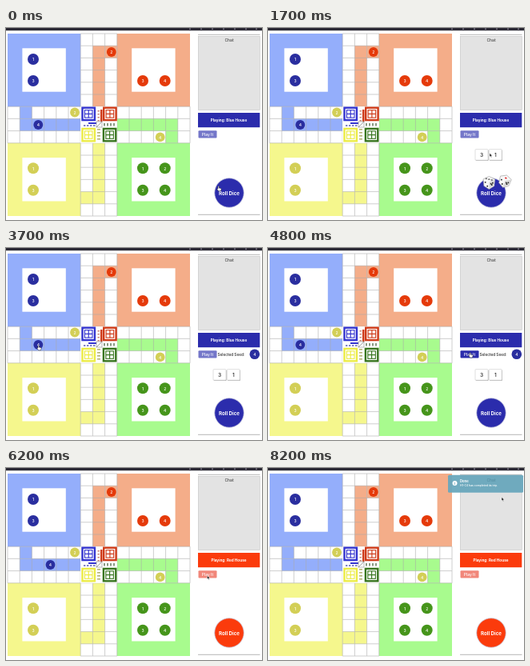
These frames come from a looping animation (320 px wide and 240 px high, 8.3 s). An HTML page:

```html
<!DOCTYPE html>
<html lang="en">
<head>
<meta charset="utf-8">
<title>Board game</title>
<style>
  html, body { margin: 0; width: 100%; height: 100%; overflow: hidden; background: #fff; }
  svg { display: block; width: 100vw; height: 100vh; }
  text { font-family: Inter, Roboto, sans-serif; font-weight: 500; text-anchor: middle; dominant-baseline: central; }
  .left { text-anchor: start; }
  .bold { font-weight: 700; }
</style>
</head>
<body>
<svg id="stage" viewBox="0 0 320 240"></svg>
<script>
const LOOP = 8300, CELL = 15.2, X0 = 2, Y0 = 7;
const LIGHT = { blue: '#94aefb', red: '#f4ad89', yellow: '#f5f78d', green: '#a8fb8e' };
const DARK = { blue: '#2a2e9f', red: '#e53a0a', yellow: '#d3cf56', green: '#46951b' };
const EMBLEM = { blue: '#3434cf', red: '#cf3a18', yellow: '#ecec45', green: '#38751f' };

const rect = (x, y, w, h, fill, extra = '') =>
  `<rect x="${x}" y="${y}" width="${w}" height="${h}" fill="${fill}" ${extra}/>`;
const text = (x, y, size, fill, str, extra = '') =>
  `<text x="${x}" y="${y}" font-size="${size}" fill="${fill}" ${extra}>${str}</text>`;
const line = (x1, y1, x2, y2, color = '#bbb', w = .7) =>
  `<path d="M${x1} ${y1}L${x2} ${y2}" stroke="${color}" stroke-width="${w}"/>`;
const cells = (col, row, w, h, fill) =>
  rect(X0 + col * CELL, Y0 + row * CELL, w * CELL, h * CELL, fill);
const token = (x, y, team, n, r) =>
  `<g transform="translate(${x} ${y})"><circle r="${r}" fill="${DARK[team]}"/>${text(0, .2, 5, '#fff', n)}</g>`;

function house(team, col, row) {
  const x = X0 + col * CELL, y = Y0 + row * CELL;
  return cells(col, row, 6, 6, LIGHT[team]) + rect(x + 18.4, y + 18.3, 54.4, 54.4, '#fff');
}

function grid() {
  let s = '';
  for (let i = 0; i <= 15; i++) {
    const x = X0 + i * CELL, y = Y0 + i * CELL;
    const [a, b] = i >= 6 && i <= 9 ? [0, 15] : [6, 9];
    s += line(x, Y0 + a * CELL, x, Y0 + b * CELL, '#a9a9a9', .8);
    s += line(X0 + a * CELL, y, X0 + b * CELL, y, '#a9a9a9', .8);
  }
  return `<g opacity=".7">${s}</g>`;
}

function emblem(team, x, y) {
  const c = EMBLEM[team];
  let s = rect(x + 1.2, y + 1.2, 15.4, 15.4, '#fff', `stroke="${c}" stroke-width="2.4"`)
        + rect(x + 3.6, y + 3.6, 10.6, 10.6, c);
  for (const i of [4.7, 9.5]) for (const j of [4.7, 9.5]) s += rect(x + i, y + j, 3.6, 3.6, '#fff');
  return s;
}

function center() {
  let s = rect(93.2, 98.2, 45.6, 45.6, '#fff')
    + rect(103, 118, 14, 2, EMBLEM.blue) + rect(118, 102, 2.5, 15, EMBLEM.red);
  for (let i = 0; i < 4; i++) {
    const d = i * 4;
    s += rect(97 + d, 121, 2.4, 2, '#8080c8') + rect(122 + d, 119, 2, 3.5, '#8a9a84')
       + rect(114.5, 103 + d, 2.5, 1.5, '#cf8a78') + rect(114, 126 + d, 4, 1.6, '#b4b478');
  }
  s += rect(113, 117, 7, 7, '#fff', 'stroke="#888" stroke-width=".6"') + line(113, 124, 120, 117, '#777');
  return s + emblem('blue', 94.3, 98.5) + emblem('red', 121, 98.5)
           + emblem('yellow', 94.3, 124.7) + emblem('green', 120.7, 124.7);
}

const die = (id, pips, color) => `<g id="${id}"><g transform="scale(1.15)">
  <path d="M0-7 6.3-4 5.6 3.5 0 7-5.6 3.5-6.3-4Z" fill="#f8f8f8" stroke="#999" stroke-width=".5"/>
  <path d="M0-.6 6.3-4 5.6 3.5 0 7Z" fill="#d9d9d9"/>
  ${pips.map(x => `<ellipse cx="${x}" cy="${-3.8 + x / 4}" rx="1.1" ry=".8" fill="${color}"/>`).join('')}
  <g fill="#222"><circle cx="-4" cy="-.6" r=".8"/><circle cx="-1.8" cy="3.6" r=".8"/>
  <circle cx="2" cy="1" r=".8"/><circle cx="3" cy="2.2" r=".8"/><circle cx="4" cy=".2" r=".8"/></g></g></g>`;

const score = (x, n) => rect(x - 7.4, 152.4, 16, 13.6, '#aaa', 'rx="1"')
  + rect(x - 8, 151.6, 16, 13.6, '#fff', 'rx="1" stroke="#ccc" stroke-width=".6"') + text(x, 158.5, 6.6, '#222', n);

const homeTokens = {
  blue: [[34, 39, 1], [34, 66, 3]],
  red: [[171, 66, 3], [198.7, 66, 4]],
  yellow: [[34, 175.3, 1], [34, 202.7, 3]],
  green: [[171, 175.3, 1], [198.7, 175.3, 2], [171, 202.7, 3], [198.7, 202.7, 4]]
};
const pathTokens = { red: [[131.8, 30, 2]], yellow: [[86, 105.5, 2], [192.7, 136.4, 4]] };
const allTokens = (teams, r) => Object.entries(teams)
  .flatMap(([team, list]) => list.map(([x, y, n]) => token(x, y, team, n, r))).join('');

document.getElementById('stage').innerHTML =
  rect(0, 0, 320, 240, '#fff') + rect(0, 0, 320, 3.2, '#2b2934')
  + [229, 243, 257, 271, 285, 299, 312].map(x => rect(x, .6, 2, 1.3, '#85808f')).join('')
  + house('blue', 0, 0) + house('red', 9, 0) + house('yellow', 0, 9) + house('green', 9, 9)
  + cells(1, 7, 5, 1, LIGHT.blue) + cells(1, 6, 1, 1, LIGHT.blue)
  + cells(7, 1, 1, 5, LIGHT.red) + cells(8, 1, 1, 1, LIGHT.red)
  + cells(9, 7, 5, 1, LIGHT.green) + cells(13, 8, 1, 1, LIGHT.green)
  + cells(7, 9, 1, 5, LIGHT.yellow) + cells(6, 13, 1, 1, LIGHT.yellow)
  + grid() + center() + allTokens(homeTokens, 7) + allTokens(pathTokens, 5.9)
  + `<g id="runner">${token(0, 0, 'blue', 4, 5.9)}</g>`
  + line(240, 8.3, 317.5, 8.3, '#999') + rect(240.3, 10.3, 77, 92, '#e3e3e3', 'stroke="#c4c4c4" stroke-width=".6"')
  + text(279, 14.6, 5, '#444', 'Chat')
  + rect(240, 106, 77.3, 18.2, '', 'id="turn"') + text(278.5, 115.2, 4.7, '#fff', '', 'id="turnText" class="bold"')
  + rect(240.5, 128.2, 23, 9.4, '', 'id="play" rx="1"') + text(252, 133, 4.9, '#fff', 'Play It')
  + `<g id="seed">${text(264.5, 133, 4.7, '#222', 'Selected Seed:', 'class="left"')}${token(310.8, 132.8, 'blue', 4, 6.3)}</g>`
  + `<g id="scores">${score(267, 3)}${score(284.3, 1)}</g>`
  + '<circle id="roll" cx="279" cy="206" r="18.3" stroke="#c9c9df" stroke-width=".8"/>'
  + text(279, 206.5, 6.2, '#fff', 'Roll Dice', 'class="bold"')
  + line(240, 233.3, 317.5, 233.3, '#999')
  + die('dieA', [-3, 0, 3], '#777') + die('dieB', [0], '#d22')
  + `<g id="toast">${rect(225, 8.7, 94, 22, '#69a7bd', 'rx="1.5" opacity=".94"')}
     ${text(279, 14.6, 5, '#487f93', 'Chat', 'opacity=".45"')}
     <circle cx="233.5" cy="19" r="3" fill="#fff"/>${text(233.5, 19.1, 4.5, '#69a7bd', 'i', 'class="bold"')}
     ${text(240, 16.2, 4.2, '#fff', 'Done', 'class="left bold"')}
     ${text(240, 22.4, 3.4, '#fff', 'H1-C4 has completed its trip.', 'class="left"')}</g>`
  + `<g id="cursor" stroke-width=".5"><path id="arrow" d="M0 0V4.6L1.1 3.6 1.9 5.3 2.7 4.9 1.9 3.3H3.4Z" fill="#111" stroke="#fff"/>
     <path id="hand" d="M0 0Q.7-.8 1.3 0V2L3.6 2.5Q4.3 2.8 4 3.9L3.4 5.8H.6L-1.3 3.4Q-1.2 2.7 0 3.1Z" fill="#fff" stroke="#222"/></g>`;

const $ = id => document.getElementById(id);
const place = (id, x, y, a = 0) => $(id).setAttribute('transform', `translate(${x} ${y}) rotate(${a})`);
const show = (id, on) => $(id).style.display = on ? '' : 'none';
const fill = (id, color) => $(id).setAttribute('fill', color);

// Keys are [time, x, y]
function along(keys, t) {
  const i = keys.findIndex(k => k[0] > t);
  if (i === 0) return keys[0].slice(1);
  if (i < 0) return keys[keys.length - 1].slice(1);
  const [a, b] = [keys[i - 1], keys[i]];
  const u = (t - a[0]) / (b[0] - a[0]), e = u * u * (3 - 2 * u);
  return [a[1] + (b[1] - a[1]) * e, a[2] + (b[2] - a[2]) * e];
}

const pointer = [[0, 265, 198], [300, 272, 205], [1300, 273, 206], [1700, 277, 156.5], [2200, 277, 156.5],
  [2900, 63.3, 146], [3400, 40, 122], [3800, 40, 122], [4600, 252, 131], [5700, 252, 133],
  [6200, 251.5, 134.5], [7300, 252, 135], [8000, 292, 36.5]];
const pathA = [[500, 250, 183], [800, 261.5, 189], [1300, 276.3, 193.5]];
const pathB = [[500, 271, 182], [800, 282.5, 188], [1300, 296, 191.7]];
const stepTimes = [5900, 6400, 6800];

function draw(t) {
  const red = t >= 5400, rolled = t >= 600;
  const main = red ? '#fb3b0c' : '#2b2cac';
  fill('turn', main);
  fill('roll', main);
  $('turnText').textContent = `Playing: ${red ? 'Red' : 'Blue'} House`;
  fill('play', red ? '#f1877a' : t >= 4500 ? '#2b2cac' : '#7477c9');
  show('scores', rolled && !red);
  show('seed', t >= 3500 && !red);

  const steps = stepTimes.filter(s => t >= s).length;
  place('runner', 40.3 + steps * CELL, 121);
  show('runner', t < 7300);

  const spin = Math.max(0, 1300 - t) * .55;
  place('dieA', ...along(pathA, t), spin);
  place('dieB', ...along(pathB, t), 18 - spin);
  show('dieA', rolled && t < 3700);
  show('dieB', rolled && t < 3700);

  const slide = Math.min(1, Math.max(0, (t - 7400) / 300));
  show('toast', slide > 0);
  place('toast', 95 * (1 - slide) ** 2, 0);
  $('toast').style.opacity = slide;

  const overLink = t < 1400 || (t >= 3300 && t < 3900) || (t >= 4500 && t < 5400);
  place('cursor', ...along(pointer, t));
  show('hand', overLink);
  show('arrow', !overLink);
}

function tick() {
  draw(Math.floor(performance.now() % LOOP / 100) * 100);
  requestAnimationFrame(tick);
}
tick();
</script>
</body>
</html>
```
